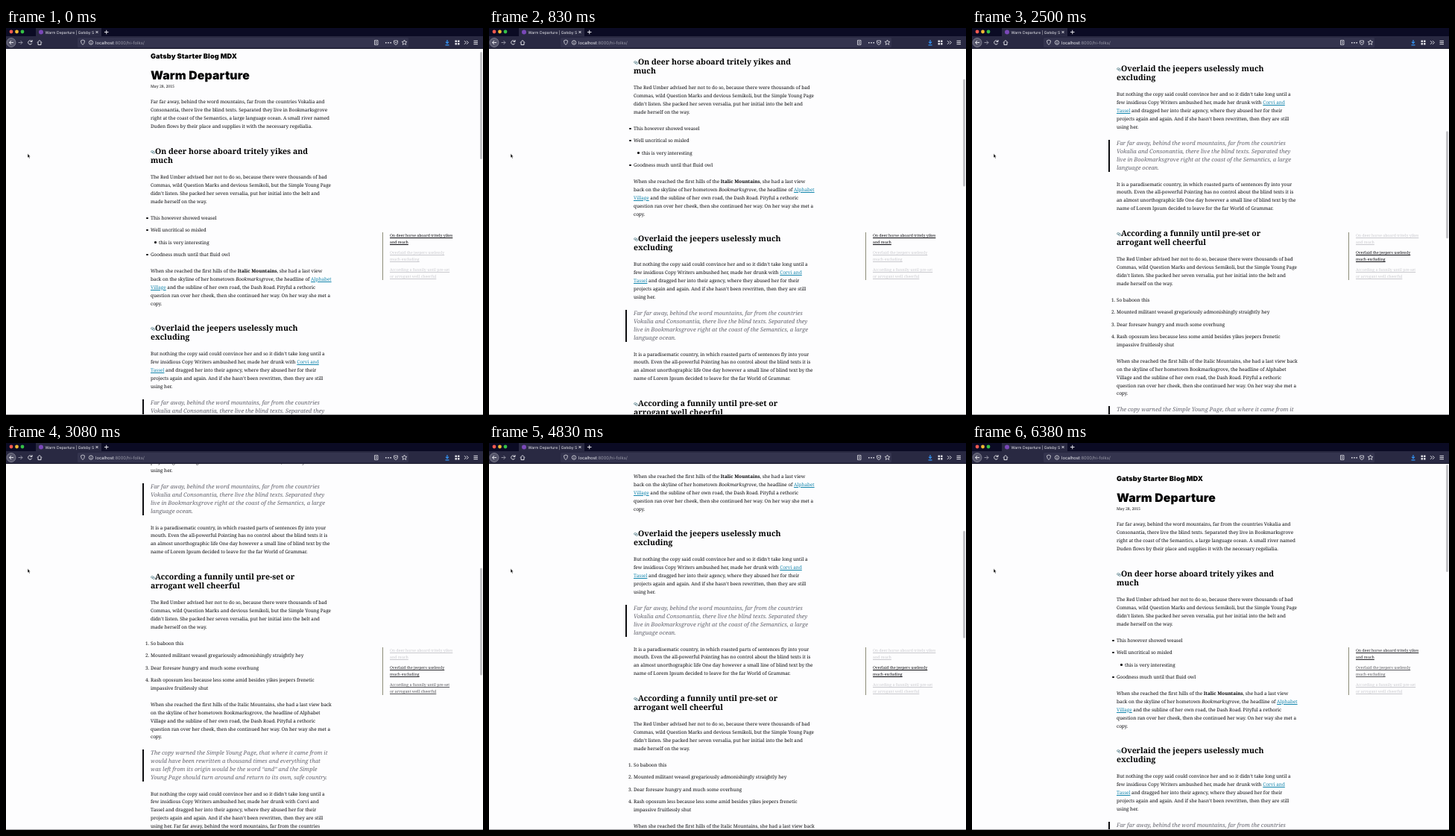
An HTML page for the animation above (6430 ms loop, 640 px wide and 519 px high).

```html
<!DOCTYPE html>
<html lang="en">
<head>
<meta charset="utf-8">
<title>Blog scroll</title>
<style>
html, body { margin: 0; width: 100%; height: 100%; overflow: hidden; background: #fdfdfe; }
body { position: relative; font-family: "Noto Serif", serif; color: #0b0b0e; text-rendering: geometricPrecision; }
#view { position: absolute; left: 0; top: 28px; width: 640px; height: 491px; overflow: hidden; }
#page { position: absolute; left: 0; top: -28px; width: 640px; height: 1100px; }
.line { position: absolute; white-space: nowrap; line-height: 12px; }
.site, .title { font-family: Inter, "Open Sans", sans-serif; font-weight: 900; color: #000; }
.site { font-size: 9.2px; letter-spacing: .1px; }
.title { font-size: 15.8px; letter-spacing: .15px; }
.date, .toc { font-size: 5.2px; }
.p { font-size: 6.36px; font-weight: 500; }
.h { font-size: 10.5px; font-weight: 800; color: #000; }
.q { font-size: 7.6px; font-style: italic; color: #62626c; }
.toc, a { text-decoration: underline; text-decoration-thickness: .6px; text-underline-offset: 1.2px; }
.bar, .dot { position: absolute; background: #0b0b0e; }
.dot { width: 2.6px; height: 2.6px; border-radius: 50%; }
a { color: #1486ad; }
svg { position: absolute; left: 0; top: 0; }
#thumb { position: absolute; left: 636px; top: 0; width: 3px; height: 144px; border-radius: 2px; background: #c2c2c6; }
</style>
</head>
<body>
<div id="view"><div id="page"></div></div>
<div id="toc"><div class="bar" style="left:505px;top:274px;width:1px;height:64px;background:#8c8c78"></div></div>
<div id="thumb"></div>
<svg width="640" height="519" fill="none" stroke="#e2e2e8" stroke-width="1" font-family="Inter, Roboto, sans-serif">
  <g stroke="none">
    <path fill="#0b0b24" d="M0 0h640v12H0z"/>
    <path fill="#292942" d="M40 0h88v12H40zM0 11h640v17H0z"/>
    <path fill="#1a1a2c" d="M0 27h640v1H0z"/>
    <rect x="96" y="13" width="444" height="13" rx="1.5" fill="#34344e"/>
    <circle cx="7" cy="5" r="2.4" fill="#f25a50"/>
    <circle cx="14.5" cy="5" r="2.4" fill="#f0b832"/>
    <circle cx="22" cy="5" r="2.4" fill="#35c146"/>
    <circle cx="47" cy="5.5" r="3" fill="#7a48b8"/>
    <text x="52.5" y="7.5" font-size="5.1" fill="#e8e8ee">Warm Departure | Gatsby S</text>
    <text x="120" y="21.8" font-size="5.8" fill="#f2f2f6">localhost<tspan fill="#9a9aa8">:8000/hi-folks/</tspan></text>
    <circle cx="7" cy="19.5" r="6" fill="#55556a"/>
    <path fill="#e2e2e8" d="M509 19h1.6v1.6h-1.6zM512.2 19h1.6v1.6h-1.6zM515.4 19h1.6v1.6h-1.6z"/>
    <path fill="#e2e2e8" d="M602.5 16.5h2.5v2.5h-2.5zM606 16.5h2.5v2.5h-2.5zM602.5 20h2.5v2.5h-2.5zM606 20h2.5v2.5h-2.5z"/>
    <path fill="#9c9ca0" d="M0 518h640v1H0z"/>
  </g>
  <circle cx="7" cy="19.5" r="6" stroke="#a0a0ac" stroke-width=".6"/>
  <path d="M120.5 4l3 3m0-3l-3 3M132 5.5h5.5M134.75 2.75v5.5"/>
  <path d="M10 19.5H4.5M7 17l-2.5 2.5L7 22"/>
  <path stroke="#9090a0" d="M16.5 19.5H22M19.5 17l2.5 2.5-2.5 2.5"/>
  <path d="M34.5 18a2.6 2.6 0 1 0 .2 2.5M35 16v2.5h-2.5"/>
  <path d="M42 19.5l3-3 3 3M43 19v3.5h4V19"/>
  <g stroke-width=".8">
    <path d="M100.5 17l2.5-1 2.5 1q0 4-2.5 5.5-2.5-1.5-2.5-5.5z"/>
    <circle cx="114" cy="19.5" r="2.7"/><path d="M114 19v2M114 17.6v.6"/>
    <path d="M494.5 16.5h4.5v6h-4.5zM495.5 18.5h2.5M495.5 20.5h2.5"/>
    <path d="M520.5 17h5v2q0 3-2.5 3.5-2.5-.5-2.5-3.5zM521.8 18.8l1.2 1.2 1.2-1.2"/>
    <path d="M534.5 16l1 2.2 2.4.2-1.8 1.6.6 2.4-2.2-1.3-2.2 1.3.6-2.4-1.8-1.6 2.4-.2z"/>
  </g>
  <path stroke="#3592f2" stroke-width="1.2" d="M592 16v4.5M590 18.7l2 2 2-2M589.5 22.8h5"/>
  <path d="M615 17.2l2.3 2.3-2.3 2.3M618 17.2l2.3 2.3-2.3 2.3M627.5 17.3h5.5M627.5 19.5h5.5M627.5 21.7h5.5"/>
  <path fill="#000" stroke="#fff" stroke-width=".5" d="M29 168.5v5.5l1.2-1.1 1 2 .9-.4-.9-2h1.5z"/>
</svg>
<script>
const LOOP = 6430;
const page = document.getElementById('page');
const toc = document.getElementById('toc');
const thumb = document.getElementById('thumb');

function add(parent, cls, x, y, html = '', style = '') {
  const el = document.createElement('div');
  el.className = cls;
  el.style.cssText = `left:${x}px;top:${y}px;${style}`;
  el.innerHTML = html;
  parent.append(el);
  return el;
}

// y is the middle of the first line
function block(cls, y, text, x = 194, pitch = 10.9) {
  text.split('\n').forEach((s, i) => add(page, 'line ' + cls, x, y + i * pitch - 6, s));
}

function heading(y, first, second) {
  block('h', y, first, 200);
  block('h', y + 11.7, second);
  add(page, 'line', 194, y - 3, `<svg width="7" height="7" fill="none" stroke="#5f8690" stroke-width=".8">
    <ellipse cx="2.2" cy="2.8" rx="1.8" ry="1.2"/><ellipse cx="4.2" cy="4.2" rx="1.8" ry="1.2"/></svg>`);
}

function quote(y, text) {
  block('q', y, text);
  add(page, 'bar', 183, y - 5, '', 'width:2px;height:43px');
}

function bullet(y, text, x = 194) {
  add(page, 'dot', x - 6, y - 1.1);
  block('p', y, text, x);
}

function item(y, n, text) {
  block('p', y, n + '.', 187);
  block('p', y, text);
}

const advice = `The Red Umber advised her not to do so, because there were thousands of bad
Commas, wild Question Marks and devious Semikoli, but the Simple Young Page
didn’t listen. She packed her seven versalia, put her initial into the belt and
made herself on the way.`;

block('site', 49, 'Gatsby Starter Blog MDX');
block('title', 74, 'Warm Departure');
block('date', 87.5, 'May 28, 2015');
block('p', 109.3, `Far far away, behind the word mountains, far from the countries Vokalia and
Consonantia, there live the blind texts. Separated they live in Bookmarksgrove
right at the coast of the Semantics, a large language ocean. A small river named
Duden flows by their place and supplies it with the necessary regelialia.`);
heading(176, 'On deer horse aboard tritely yikes and', 'much');
block('p', 210, advice);
bullet(265, 'This however showed weasel');
bullet(281, 'Well uncritical so misled');
bullet(297.5, 'this is very interesting', 205);
bullet(314, 'Goodness much until that fluid owl');
block('p', 336, `When she reached the first hills of the <b>Italic Mountains</b>, she had a last view
back on the skyline of her hometown <i>Bookmarksgrove</i>, the headline of <a>Alphabet</a>
<a>Village</a> and the subline of her own road, the Dash Road. Pityful a rethoric
question ran over her cheek, then she continued her way. On her way she met a
copy.`);
heading(413, 'Overlaid the jeepers uselessly much', 'excluding');
block('p', 447, `But nothing the copy said could convince her and so it didn’t take long until a
few insidious Copy Writers ambushed her, made her drunk with <a>Corvi and</a>
<a>Tassel</a> and dragged her into their agency, where they abused her for their
projects again and again. And if she hasn’t been rewritten, then they are still
using her.`);
quote(513, `Far far away, behind the word mountains, far from the countries
Vokalia and Consonantia, there live the blind texts. Separated they
live in Bookmarksgrove right at the coast of the Semantics, a large
language ocean.`);
block('p', 567.5, `It is a paradisematic country, in which roasted parts of sentences fly into your
mouth. Even the all-powerful Pointing has no control about the blind texts it is
an almost unorthographic life One day however a small line of blind text by the
name of Lorem Ipsum decided to leave for the far World of Grammar.`);
heading(634, 'According a funnily until pre-set or', 'arrogant well cheerful');
block('p', 668, advice);
item(723, 1, 'So baboon this');
item(739.3, 2, 'Mounted militant weasel gregariously admonishingly straightly hey');
item(755.7, 3, 'Dear foresaw hungry and much some overhung');
item(772, 4, 'Rash opossum less because less some amid besides yikes jeepers frenetic\nimpassive fruitlessly shut');
block('p', 804.8, `When she reached the first hills of the Italic Mountains, she had a last view back
on the skyline of her hometown Bookmarksgrove, the headline of Alphabet
Village and the subline of her own road, the Dash Road. Pityful a rethoric
question ran over her cheek, then she continued her way. On her way she met a
copy.`);
quote(870, `The copy warned the Simple Young Page, that where it came from it
would have been rewritten a thousand times and everything that
was left from its origin would be the word “and” and the Simple
Young Page should turn around and return to its own, safe country.`);
block('p', 924.5, `But nothing the copy said could convince her and so it didn’t take long until a
few insidious Copy Writers ambushed her, made her drunk with Corvi and
Tassel and dragged her into their agency, where they abused her for their
projects again and again. And if she hasn’t been rewritten, then they are still
using her. Far far away, behind the word mountains, far from the countries
Vokalia and Consonantia, there live the blind texts. Separated they live in
Bookmarksgrove right at the coast of the Semantics, a large language ocean.
A small river named Duden flows by their place and supplies it with the`);

const entries = [
  ['On deer horse aboard tritely yikes', 'and much'],
  ['Overlaid the jeepers uselessly', 'much excluding'],
  ['According a funnily until pre-set', 'or arrogant well cheerful'],
].map((lines, i) => lines.map((s, j) => add(toc, 'line toc', 515, 272 + i * 23 + j * 8.8, s)));

// [time, scroll offset]
const keys = [[0, 10], [500, 59], [1330, 249], [1880, 312], [2040, 312], [3080, 454], [3380, 482], [4000, 480],
  [4250, 360], [4700, 300], [5330, 272], [5420, 272], [5670, 265], [6000, 110], [6340, 0], [LOOP, 0]];

const slope = i => (keys[i + 1][1] - keys[i][1]) / (keys[i + 1][0] - keys[i][0]);

function tangent(i) {
  if (i === 0) return slope(0);
  if (i === keys.length - 1) return 0;
  const a = slope(i - 1), b = slope(i);
  return a * b > 0 ? 2 * a * b / (a + b) : 0;
}

// Monotone cubic through the keys
function scrollAt(t) {
  let i = 0;
  while (t >= keys[i + 1][0]) i++;
  const [t0, a] = keys[i], [t1, b] = keys[i + 1];
  const h = t1 - t0, u = (t - t0) / h, v = 1 - u;
  return v * v * (1 + 2 * u) * a + u * u * (3 - 2 * u) * b
    + h * u * v * (v * tangent(i) - u * tangent(i + 1));
}

// [time, active entry]
const switches = [[-999, 0], [1170, 1], [2985, 2], [4000, 2], [4420, 1], [6220, 0]].filter((s, i, all) => !i || s[1] !== all[i - 1][1]);
const FADE = 250;

function weight(entry, t) {
  const n = switches.findLastIndex(s => t >= s[0]);
  const k = Math.min(1, (t - switches[n][0]) / FADE);
  const w = entry === switches[n][1] ? k : n && entry === switches[n - 1][1] ? 1 - k : 0;
  return 1 - (1 - w) ** 2;
}

function draw(now) {
  const t = now % LOOP;
  const y = scrollAt(t);
  page.style.transform = `translateY(${-Math.round(y)}px)`;
  thumb.style.transform = `translateY(${29 + y * 0.305}px)`;
  entries.forEach((lines, i) => {
    const c = 200 - 190 * weight(i, t);
    lines.forEach(el => el.style.color = `rgb(${c},${c},${c + 5})`);
  });
  requestAnimationFrame(() => draw(performance.now() - start));
}

const start = performance.now();
draw(0);
</script>
</body>
</html>
```
